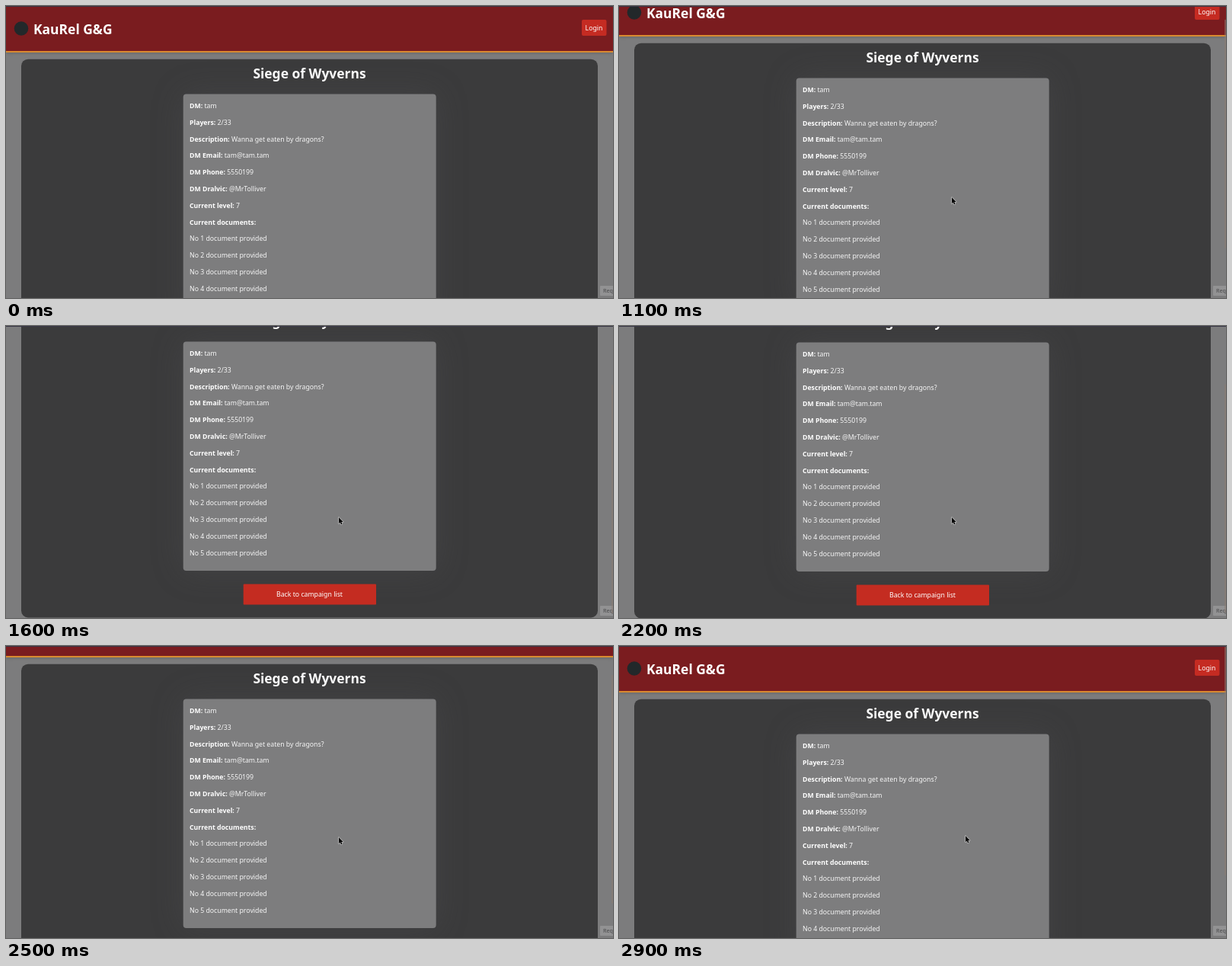
Write an HTML page with a canvas that moves like this. It is 797 px wide and 383 px high and loops after 3000 ms.

```html
<!DOCTYPE html>
<html lang="en">
<head>
<meta charset="utf-8">
<title>Campaign page</title>
<style>
  html, body { margin: 0; width: 100%; height: 100%; overflow: hidden; background: #7c7c7d; }
  canvas { display: block; width: 797px; height: 383px; }
</style>
</head>
<body>
<canvas id="stage" width="797" height="383"></canvas>
<script>
const W = 797, H = 383, LOOP = 3000, STEP = 100;
const ctx = document.getElementById('stage').getContext('2d');
const FAMILY = '"Noto Sans", "Open Sans", sans-serif';
const BODY = `8.72px ${FAMILY}`;
const BOLD = `bold 8.72px ${FAMILY}`;
const HEAD = `bold 17.44px ${FAMILY}`;

const rows = [
  ['DM:', 'tam'],
  ['Players:', '2/33'],
  ['Description:', 'Wanna get eaten by dragons?'],
  ['DM Email:', 'tam@tam.tam'],
  ['DM Phone:', '5550199'],
  ['DM Dralvic:', '@MrTolliver'],
  ['Current level:', '7'],
  ['Current documents:', ''],
  ...[1, 2, 3, 4, 5].map(n => ['', `No ${n} document provided`])
];

// Keys: time, value(s)
const scrollKeys = [
  [800, 0], [900, 2], [1000, 8], [1100, 21], [1200, 47], [1300, 78], [1400, 94], [1600, 95],
  [2100, 95], [2200, 94], [2300, 90], [2400, 77.5], [2500, 46], [2600, 15.5], [2700, 0]
];
const cursorKeys = [
  [300, 765, 289], [400, 640, 275], [500, 525, 264], [600, 462, 257], [700, 441, 254],
  [800, 437, 251], [2500, 437, 251], [2600, 438, 252], [2700, 438, 252], [2900, 455, 249]
];

function sample(keys, t) {
  if (t <= keys[0][0]) return keys[0].slice(1);
  for (let i = 1; i < keys.length; i++) {
    const a = keys[i - 1], b = keys[i];
    if (t <= b[0]) {
      const u = (t - a[0]) / (b[0] - a[0]);
      return a.slice(1).map((v, k) => v + (b[k + 1] - v) * u);
    }
  }
  return keys[keys.length - 1].slice(1);
}

function box(x, y, w, h, r, color) {
  ctx.fillStyle = color;
  ctx.beginPath();
  ctx.roundRect(x, y, w, h, r);
  ctx.fill();
}

function text(str, x, y, font, color = '#fff', align = 'left') {
  ctx.font = font;
  ctx.fillStyle = color;
  ctx.textAlign = align;
  ctx.fillText(str, x, y);
}

function glow(blur, color, draw) {
  ctx.save();
  ctx.shadowBlur = blur;
  ctx.shadowColor = color;
  draw();
  ctx.restore();
}

function header() {
  glow(5, 'rgba(0,0,0,.25)', () => box(0, -2, W, 63, 0, '#d98a30'));
  box(0, -2, W, 61, 0, '#7a1c1f');
  ctx.fillStyle = '#22282a';
  ctx.beginPath();
  ctx.arc(20, 29.5, 9.3, 0, Math.PI * 2);
  ctx.fill();
  text('KauRel G&G', 36, 36.7, HEAD);
  box(756, 18, 32.5, 21, 2, '#c52b22');
  text('Login', 772, 31.6, BODY, '#fff', 'center');
}

function panel() {
  box(20, 69.7, 757, 407.8, 9, '#3b3b3c');
  text('Siege of Wyverns', 398.5, 95, HEAD, '#fff', 'center');
  glow(42, 'rgba(90,90,92,.28)', () => box(232.7, 115.4, 332, 300.6, 4, '#7d7d7e'));
  rows.forEach(([label, value], i) => {
    const y = 133.9 + i * 21.8;
    let x = 241;
    if (label) {
      text(label, x, y, BOLD);
      x += ctx.measureText(label + ' ').width;
    }
    text(value, x, y, BODY, '#f6f6f6');
  });
  box(311.7, 433.4, 174.3, 27.2, 1, '#c42c21');
  text('Back to campaign list', 398.5, 450, BODY, '#fff', 'center');
}

function cursor(x, y) {
  ctx.save();
  ctx.translate(x, y);
  ctx.beginPath();
  [[0, 0], [0, 8.2], [1.8, 6.6], [3, 9.4], [4.5, 8.7], [3.3, 6], [5.8, 5.9]]
    .forEach(p => ctx.lineTo(...p));
  ctx.closePath();
  ctx.lineWidth = 1.2;
  ctx.lineJoin = 'round';
  ctx.strokeStyle = 'rgba(235,235,235,.75)';
  ctx.stroke();
  ctx.fillStyle = '#080808';
  ctx.fill();
  ctx.restore();
}

function render(t) {
  const [scroll] = sample(scrollKeys, t);
  box(0, 0, W, H, 0, '#7c7c7d');

  ctx.save();
  ctx.translate(0, -scroll);
  header();
  panel();
  ctx.restore();

  box(780, 367, 20, 13, 1, '#929293');
  text('Req', 784, 376, `7.2px ${FAMILY}`, '#4a4a4b');
  box(0, 0, W, 1, 0, '#383747');

  if (t >= 300) {
    box(795, 1 + scroll * 0.8, 2, 300, 1, 'rgba(140,125,115,.5)');
    cursor(...sample(cursorKeys, t));
  }
}

const start = performance.now();
function tick() {
  const t = (performance.now() - start) % LOOP;
  render(Math.floor(t / STEP) * STEP);
  requestAnimationFrame(tick);
}
tick();
</script>
</body>
</html>
```
